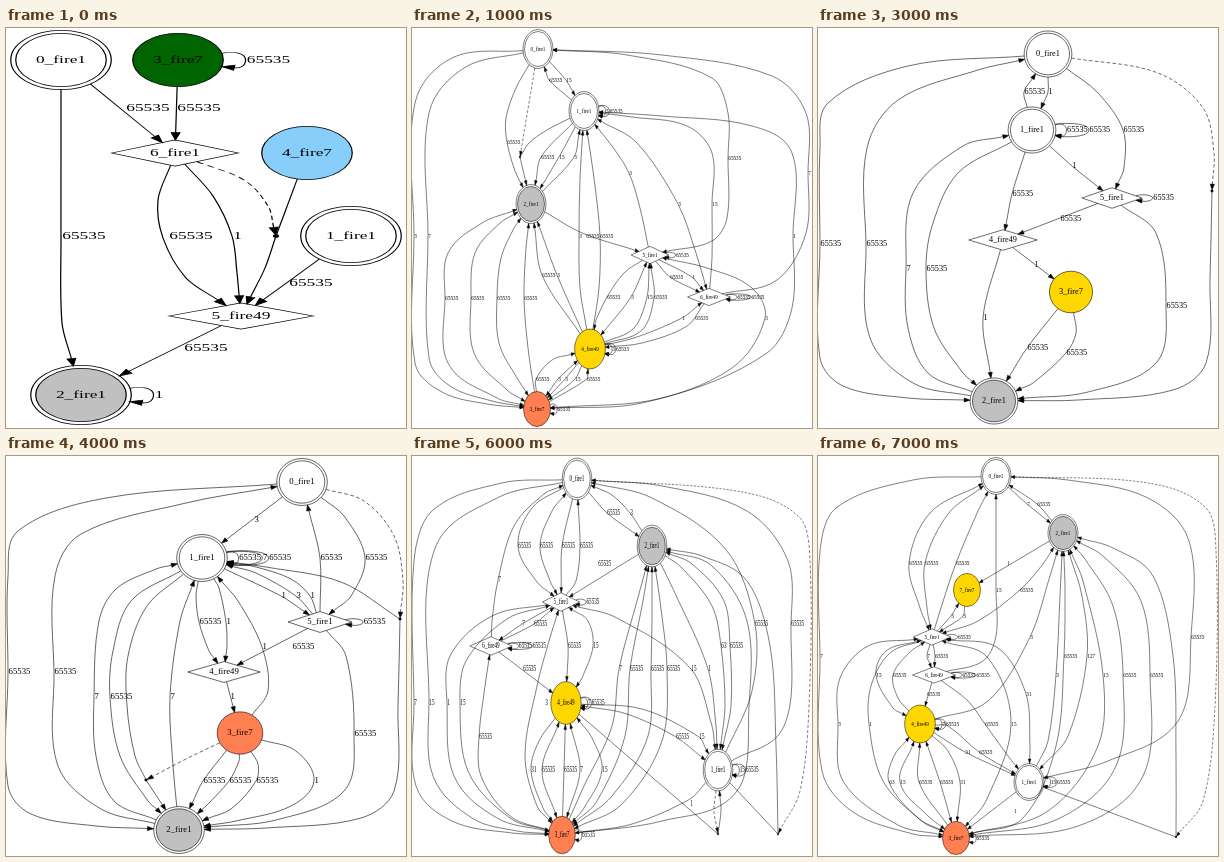
These frames come from a looping animation (400 px wide and 400 px high, 8000 ms). An HTML page:

```html
<!DOCTYPE html>
<html lang="en">
<head>
<meta charset="utf-8">
<title>Evolving graph</title>
<style>
html, body { margin: 0; width: 100%; height: 100%; overflow: hidden; background: #fff; }
svg { display: block; width: 100%; height: 100%; }
text { font: 14px "Liberation Serif", "Times New Roman", serif; fill: #000; stroke: none; }
</style>
</head>
<body>
<svg id="stage" viewBox="0 0 400 400"></svg>
<script>
const stage = document.getElementById('stage');
const GREY = '#c0c0c0', GOLD = '#ffd700', CORAL = '#ff7f50';
const scenes = [];

function make(parent, tag, attrs, text) {
  const el = document.createElementNS('http://www.w3.org/2000/svg', tag);
  for (const k in attrs) el.setAttribute(k, attrs[k]);
  if (text) el.textContent = text;
  return parent.appendChild(el);
}

const toward = (a, b, d) => {
  const len = Math.hypot(b[0] - a[0], b[1] - a[1]) || 1;
  return [a[0] + (b[0] - a[0]) / len * d, a[1] + (b[1] - a[1]) / len * d];
};

// Smooth path whose handles follow the chord between neighbours
function spline(p) {
  const last = p.length - 1;
  const handle = (i, sign, other) => {
    const a = p[Math.max(i - 1, 0)], b = p[Math.min(i + 1, last)];
    const len = Math.hypot(p[i][0] - other[0], p[i][1] - other[1]) / 3;
    const q = toward(a, b, len);
    return [p[i][0] + sign * (q[0] - a[0]), p[i][1] + sign * (q[1] - a[1])];
  };
  let d = 'M' + p[0];
  for (let i = 0; i < last; i++)
    d += `C${handle(i, 1, p[i + 1])} ${handle(i + 1, -1, p[i])} ${p[i + 1]}`;
  return d;
}

// Shapes live in points; each graph is squeezed to the stage by sx, sy
function graph(sx, sy, draw) {
  const g = make(stage, 'g', {
    transform: `scale(${sx} ${sy})`, fill: 'none', stroke: '#000',
    'stroke-width': Math.max(1, 0.5 / Math.sqrt(sx * sy)), visibility: 'hidden'
  });
  const nodes = {};
  const at = s => { const [x, y] = s.split(',').map(Number); return [x / sx, y / sy]; };
  const write = (x, y, s, anchor = 'start') =>
    make(g, 'text', { x, y: y + 4.3, 'text-anchor': anchor }, s);

  // kind: c circle, d double circle, r rhombus
  function node(name, pos, kind, fill = '#fff') {
    const [x, y] = at(pos), wide = name.endsWith('49');
    const r = kind == 'r' ? (wide ? 58 : 51) : (wide ? 41.5 : 36.5) + (kind == 'd' ? 4 : 0);
    nodes[name[0]] = { c: [x, y], r, kind };
    if (kind == 'r') make(g, 'path', { d: `M${x - r} ${y}L${x} ${y - 18}L${x + r} ${y}L${x} ${y + 18}Z`, fill });
    else make(g, 'circle', { cx: x, cy: y, r, fill: kind == 'd' ? '#fff' : fill });
    if (kind == 'd') make(g, 'circle', { cx: x, cy: y, r: r - 4, fill });
    write(x, y, name, 'middle');
  }

  function dot(id, pos) {
    const c = at(pos);
    nodes[id] = { c, r: 2, kind: 'c' };
    make(g, 'circle', { cx: c[0], cy: c[1], r: 2, fill: '#000' });
  }

  function rim(n, to) {
    const dx = to[0] - n.c[0], dy = to[1] - n.c[1];
    const d = n.kind == 'r'
      ? Math.hypot(dx, dy) / (Math.abs(dx) / n.r + Math.abs(dy) / 18) : n.r;
    return toward(n.c, to, d);
  }

  function arrow(tip, from) {
    const b = toward(tip, from, 10), nx = (tip[1] - b[1]) * 0.35, ny = (b[0] - tip[0]) * 0.35;
    make(g, 'path', { d: `M${tip}L${b[0] + nx} ${b[1] + ny}L${b[0] - nx} ${b[1] - ny}Z`, fill: '#000' });
    return b;
  }

  // link: a>b arrow, a<>b both, a-b plain, a~b dashed; *x,y via with label, @x,y label only
  function edge(link, label = '', route = '') {
    const [, a, type, b] = link.match(/(\w)(<>|>|-|~)(\w)/);
    const A = nodes[a], B = nodes[b], via = [];
    let spot;
    for (const s of route.split(' ').filter(Boolean)) {
      const p = at(s.replace(/[*@]/, ''));
      if (/[*@]/.test(s)) spot = p;
      if (s[0] != '@') via.push(p);
    }
    const first = via[0] || B.c, end = via[via.length - 1] || A.c;
    let p0 = rim(A, first), p1 = rim(B, end);
    if (type != '-') p1 = arrow(p1, via.length ? end : p0);
    if (type == '<>') p0 = arrow(p0, first);
    const path = make(g, 'path', { d: spline([p0, ...via, p1]) });
    if (type == '~') path.setAttribute('stroke-dasharray', '6 4');
    spot = spot || via[via.length >> 1] || [(p0[0] + p1[0]) / 2, (p0[1] + p1[1]) / 2];
    if (label) write(spot[0] + 1, spot[1], label);
  }

  function loop(id, ...labels) {
    const { c: [x, y], r, kind } = nodes[id];
    let out = x + r + 18;
    labels.forEach((s, i) => {
      const h = (kind == 'r' ? 4 : 9) + i, x0 = x + (kind == 'r' ? r * 0.8 : r * 0.97);
      const tip = [x0, y + h], b = arrow(tip, [x0 + 10, y + h + 1.5]), mid = (x0 + out) / 2;
      make(g, 'path', { d: `M${x0} ${y - h}C${mid} ${y - h - 4} ${out} ${y - h} ${out} ${y}S${mid + 4} ${y + h + 3} ${b}` });
      write(out + 1, y, s);
      out += s.length * 7 + 3;
    });
  }

  draw(node, edge, loop, dot);
  scenes.push(g);
}

const N = '65535';

graph(1.24, 0.73, (node, edge, loop, dot) => {
  node('0_fire1', '55,32', 'd');
  node('3_fire7', '172,32', 'c', '#006400');
  node('6_fire1', '169,125', 'r');
  node('4_fire7', '301,125', 'c', '#87cefa');
  node('1_fire1', '345,208', 'd');
  node('5_fire49', '235,288', 'r');
  node('2_fire1', '75,367', 'd', GREY);
  dot('p', '270,208');
  edge('0>2', N, '55,120 *55,208 56,295');
  edge('0>6', N, '@119,80');
  edge('3>6', N, '@170,80');
  edge('6>5', N, '152,172 157,210 180,250 @162,208');
  edge('6>5', '1', '207,168 *226,208 231,245');
  edge('6~p', '', '238,152 262,178');
  edge('4-p');
  edge('p>5', '', '259,240');
  edge('1>5', N, '@282,255');
  edge('5>2', N, '@177,320');
  loop('3', N);
  loop('2', '1');
});

graph(0.37, 0.48, (node, edge, loop, dot) => {
  node('0_fire1', '126,21', 'd');
  node('1_fire1', '172,83', 'd');
  node('2_fire1', '119,176', 'd', GREY);
  node('5_fire1', '238,227', 'r');
  node('6_fire49', '297,269', 'r');
  node('4_fire49', '178,321', 'c', GOLD);
  node('3_fire7', '125,381', 'c', CORAL);
  dot('p', '108,129');
  edge('0>3', '3', '40,30 3,75 *2,208 3,335 30,364 75,376');
  edge('0>3', '7', '52,40 17,85 *16,208 17,330 38,358 80,373');
  edge('0>2', N, '104,60 94,90 *95,114 103,143');
  edge('0~p');
  edge('1-p', '', '135,102 117,115');
  edge('p>2');
  edge('0>1', '15', '*154,52');
  edge('1>0', N, '*137,52');
  edge('0<>5', N, '215,27 300,50 316,85 *316,130 315,190 300,213');
  edge('6>0', '7', '365,252 394,205 *396,145 394,85 360,48 250,27');
  edge('3<>1', '1', '250,370 355,325 380,280 *381,208 380,125 340,98 250,88');
  edge('1>2', N, '*129,129');
  edge('1>2', '15', '*147,129');
  edge('2>1', '3', '*162,129');
  edge('4>1', '3', '168,260 *167,208 168,150');
  edge('4>1', N, '187,260 *188,208 182,150');
  edge('2>5', N, '@174,208 170,205');
  edge('5>1', '3', '228,180 *217,145 200,118');
  edge('1<>6', '3', '225,115 *266,176 284,225');
  edge('6>1', '15', '300,230 *300,176 300,125 275,98 220,89');
  edge('4>2', N, '*130,247');
  edge('4>2', '3', '*145,247');
  edge('3>2', N, '116,320 *112,270 114,220');
  edge('3<>2', N, '85,370 36,335 *33,270 36,225 70,195');
  edge('3<>2', N, '95,362 62,325 *59,270 63,225 88,195');
  edge('3<>2', N, '105,350 87,315 *85,270 89,230 102,200');
  edge('5>4', N, '212,245 *195,269 184,292');
  edge('5<>4', '3', '*219,269');
  edge('4>5', '15', '222,300 *235,269');
  edge('4>5', N, '230,302 *242,269');
  edge('5>6', N, '*258,249');
  edge('5>6', '1', '*280,249');
  edge('4>6', '1', '225,309 *270,290');
  edge('6>4', N, '@283,290 275,298 230,315');
  edge('3<>5', '3', '230,375 320,340 *353,290 340,260 295,240');
  edge('3>4', N, '*124,351 140,332');
  edge('3<>4', '3', '*146,351');
  edge('4>3', '3', '*153,351');
  edge('4>3', '15', '*163,351');
  edge('3>4', N, '*175,351');
  loop('1', '3', N);
  loop('5', N);
  loop('6', N, N);
  loop('4', '3', N);
  loop('3', N);
});

graph(0.56, 0.56, (node, edge, loop, dot) => {
  node('0_fire1', '166,26', 'd');
  node('1_fire1', '232,101', 'd');
  node('2_fire1', '216,177', 'd', GREY);
  node('4_fire49', '273,178', 'c', GOLD);
  node('5_fire7', '273,251', 'c', GOLD);
  node('6_fire49', '152,311', 'r');
  node('3_fire49', '186,363', 'r');
  dot('p', '273,362');
  dot('q', '353,396');
  edge('0>3', N, '70,36 10,75 2,120 *2,215 2,320 20,346 90,357');
  edge('0<>6', '1', '65,52 33,90 *32,177 36,265 75,297');
  edge('0>6', N, '85,62 58,110 *57,177 62,250 105,293');
  edge('0>6', N, '117,65 100,120 *98,177 103,250 125,288');
  edge('6>0', N, '147,250 *144,177 150,100');
  edge('0>2', '1', '156,75 *161,101 173,138');
  edge('0>2', N, '171,68 *183,101 195,138');
  edge('0>1', '1', '*200,64');
  edge('1>0', N, '*213,64');
  edge('0>2', N, '262,43 323,75 *330,101 322,132 275,158');
  edge('2>1', '255', '213,145 *214,139');
  edge('1>2', N, '*226,139');
  edge('1>6', '1', '209,124 180,165 *166,215 157,270');
  edge('2>3', '1', '@198,287');
  edge('4>3', '1', '*224,287');
  edge('5>6', '1', '@218,287');
  edge('2>5', '1', '@247,215');
  edge('4>5', N, '@272,215');
  edge('5~p');
  edge('6-p');
  edge('5-q');
  edge('3~q');
  edge('p>0', '', '335,340 373,310 375,200 370,110 305,57');
  edge('q>0', '', '388,375 396,330 396,200 393,100 330,47');
  edge('6>3', '1', '*154,337');
  edge('3>6', '1', '*172,337');
  loop('0', '1');
  loop('1', N, N);
});

graph(0.59, 0.57, (node, edge, loop, dot) => {
  node('0_fire1', '230,26', 'd');
  node('1_fire1', '214,102', 'd');
  node('5_fire1', '294,170', 'r');
  node('4_fire49', '185,212', 'r');
  node('3_fire7', '253,264', 'c', GOLD);
  node('2_fire1', '176,373', 'd', GREY);
  dot('p', '394,163');
  edge('0>2', N, '90,38 10,75 2,120 *2,216 2,330 25,358 90,370');
  edge('2>0', N, '95,355 52,310 *48,216 49,120 80,72 160,42');
  edge('0>1', '1', '*230,64');
  edge('1>0', N, '*206,64');
  edge('0>5', N, '280,65 *305,102 306,140');
  edge('0~p', '', '340,45 385,80 396,125');
  edge('p>2', '', '392,250 388,335 355,362 260,372');
  edge('1>5', '1', '*254,138');
  edge('1>4', N, '*194,166');
  edge('5>4', N, '@242,191');
  edge('4>3', '1', '@216,237');
  edge('5>2', N, '338,205 *348,278 338,335 270,364');
  edge('2>1', '7', '110,345 90,300 *88,241 95,165 145,118');
  edge('1>2', N, '140,145 115,195 *108,241 116,300 145,345');
  edge('4>2', '1', '*165,290');
  edge('3>2', N, '*209,320');
  edge('3>2', N, '258,305 *248,325 215,355');
  loop('1', N, N);
  loop('5', N);
});

graph(0.625, 0.58, (node, edge, loop, dot) => {
  node('0_fire1', '296,26', 'd');
  node('1_fire1', '196,102', 'd');
  node('5_fire1', '314,166', 'r');
  node('4_fire49', '218,216', 'r');
  node('3_fire7', '234,277', 'c', CORAL);
  node('2_fire1', '173,374', 'd', GREY);
  dot('p', '394,163');
  dot('q', '140,324');
  edge('0>1', '3', '@248,64');
  edge('0>2', N, '100,42 12,75 2,120 *2,216 2,330 25,358 90,370');
  edge('2>0', N, '95,353 52,310 *48,216 49,120 75,78 180,47');
  edge('0>5', N, '338,60 *359,102 345,140');
  edge('5>0', N, '*314,102');
  edge('0~p', '', '358,45 388,80 397,125');
  edge('p>1', '', '335,126 260,111');
  edge('p>2', '', '392,250 388,335 355,362 260,372');
  edge('1>5', '1', '*275,140');
  edge('5>1', '3', '*290,140 250,117');
  edge('5>1', '1', '*304,140 285,123 250,111');
  edge('5>2', N, '340,200 *348,278 338,335 270,364');
  edge('1>4', N, '190,140 *193,166 203,195');
  edge('1>4', '1', '213,132 *220,166 221,190');
  edge('5>4', N, '@286,191');
  edge('4>3', '1', '@224,241');
  edge('3>1', '1', '262,235 *256,191 232,145');
  edge('2>1', '7', '108,345 90,300 *88,241 93,165 110,133 150,113');
  edge('1>2', N, '125,145 107,195 *104,241 114,300 142,345');
  edge('1-q', '', '141,150 122,200 121,250 129,300');
  edge('q>2');
  edge('2>1', '7', '167,310 *164,241 174,165');
  edge('3~q', '', '180,303');
  edge('3>2', N, '*197,325');
  edge('3>2', N, '233,305 *223,325 200,350');
  edge('3>2', N, '252,308 *250,325 225,353');
  edge('3>2', '1', '290,295 *308,325 285,350 230,365');
  loop('1', N, '7', N);
  loop('5', N);
});

graph(0.45, 0.53, (node, edge, loop, dot) => {
  node('0_fire1', '205,24', 'd');
  node('2_fire1', '264,94', 'd', GREY);
  node('5_fire1', '166,152', 'r');
  node('6_fire49', '92,200', 'r');
  node('4_fire49', '186,250', 'c', GOLD);
  node('1_fire1', '312,312', 'd');
  node('3_fire7', '160,377', 'c', CORAL);
  dot('p', '372,378');
  edge('0>3', '7', '100,30 20,62 2,110 *2,247 4,330 40,363 100,375');
  edge('5<>3', '15', '80,165 36,200 *33,260 40,320 85,360');
  edge('6>0', '7', '92,165 *100,124 125,70 165,40');
  edge('0>5', N, '160,60 *146,90 150,125');
  edge('5>0', N, '*182,90');
  edge('0>2', N, '*226,58');
  edge('2>0', '3', '*252,58');
  edge('2>5', N, '@208,114');
  edge('1>0', N, '352,240 *356,168 335,90 265,40');
  edge('0~p', '', '335,40 393,75 398,120 397,250 390,330');
  edge('1-p');
  edge('2>1', '63', '300,150 *314,200 316,250');
  edge('5>1', '15', '220,170 *280,222 302,270');
  edge('3>2', N, '215,345 262,280 *268,213 267,150');
  edge('3<>2', N, '200,340 232,280 *240,213 252,150');
  edge('5>6', N, '*126,174');
  edge('5>4', N, '*171,195');
  edge('6>4', N, '@134,222');
  edge('3>6', N, '105,355 76,320 *74,281 82,235');
  edge('4>1', N, '*254,281');
  edge('4>3', '31', '150,285 *138,314 146,345');
  edge('3>4', N, '*168,314');
  edge('3>4', '15', '*194,314');
  edge('1>3', '1', '285,345 *235,364');
  loop('5', N);
  loop('6', N, N);
  loop('4', '7', N);
  loop('1', N);
  loop('3', N);
});

graph(0.365, 0.515, (node, edge, loop, dot) => {
  node('0_fire1', '165,23', 'd');
  node('2_fire1', '240,90', 'd', GREY);
  node('5_fire1', '149,146', 'r');
  node('6_fire49', '79,190', 'r');
  node('4_fire49', '154,247', 'c', GOLD);
  node('1_fire1', '306,314', 'd');
  node('3_fire7', '150,379', 'c', CORAL);
  dot('p', '306,378');
  dot('q', '366,378');
  edge('0>3', '7', '90,27 20,55 2,105 *2,247 4,330 40,365 100,377');
  edge('0>3', '15', '85,42 22,95 *17,247 21,320 60,362 105,375');
  edge('5>3', '1', '80,160 38,200 *35,247 42,320 85,362');
  edge('5<>3', '15', '95,163 54,205 *48,247 56,315 98,362');
  edge('6>0', '7', '80,165 *86,124 102,70 132,38');
  edge('0>5', N, '120,52 *106,90 125,126');
  edge('0<>5', N, '140,55 *128,90 138,125');
  edge('0>5', N, '*150,90');
  edge('5>0', N, '164,125 *168,90');
  edge('0>2', N, '*195,57');
  edge('2>0', '3', '*218,57 200,39');
  edge('2>5', N, '@186,108');
  edge('1>0', N, '340,235 *343,168 315,95 240,42');
  edge('1>0', N, '372,270 *379,168 376,105 335,55 250,30');
  edge('0~q', '', '330,36 388,62 398,105 397,250 388,335');
  edge('q>2', '', '364,290 358,190 335,125 290,100');
  edge('2>1', '63', '270,112 300,150 *309,190 313,250');
  edge('2<>1', N, '280,108 312,145 *318,190 319,250');
  edge('2>1', '1', '262,135 *296,213 304,270');
  edge('5<>1', '15', '205,162 *279,213 300,270');
  edge('3>2', '7', '172,330 200,270 *207,213 225,145');
  edge('3<>2', N, '185,345 213,280 *218,213 231,145');
  edge('3<>2', N, '200,340 236,280 *239,213 240,160');
  edge('3<>2', N, '210,348 250,285 *255,213 248,145');
  edge('3>2', '', '250,365 325,335 337,250 335,165 300,110');
  edge('5>6', '7', '*110,168');
  edge('6>5', N, '*122,168');
  edge('5>4', N, '*156,190');
  edge('5<>4', '15', '176,165 *181,190 170,222');
  edge('6>4', N, '@111,213');
  edge('3>6', N, '98,360 69,320 *67,281 73,230');
  edge('5<>3', '3', '137,185 125,230 113,300 125,350 @133,247');
  edge('4>3', '31', '127,285 *119,314 131,352');
  edge('4<>3', N, '*130,314');
  edge('3>4', N, '*152,314');
  edge('3<>4', '7', '*168,314');
  edge('4<>3', '15', '180,282 *190,314 172,352');
  edge('4<>1', N, '215,258 *264,281');
  edge('4>1', '15', '230,253 *287,281');
  edge('4-p', '1', '@278,348');
  edge('p>1', '', '309,355');
  edge('1~p', '', '302,355');
  edge('1-q');
  edge('1>3', '', '278,343 220,368');
  loop('5', N);
  loop('6', N, N);
  loop('4', '7', N);
  loop('1', '15', N);
  loop('3', N);
});

graph(0.37, 0.455, (node, edge, loop, dot) => {
  node('0_fire1', '178,20', 'd');
  node('2_fire1', '245,77', 'd', GREY);
  node('7_fire7', '149,134', 'c', GOLD);
  node('5_fire1', '114,181', 'r');
  node('6_fire49', '116,219', 'r');
  node('4_fire49', '102,268', 'c', GOLD);
  node('1_fire1', '211,326', 'd');
  node('3_fire7', '138,382', 'c', CORAL);
  dot('p', '358,381');
  edge('0>3', '7', '95,24 18,52 2,95 *2,200 4,315 35,356 95,378');
  edge('5<>3', '3', '50,190 22,222 *20,268 25,325 80,369');
  edge('5>3', '1', '72,197 53,230 *51,268 65,325 105,366');
  edge('0<>5', N, '112,57 *91,107 102,152');
  edge('0<>5', N, '130,58 *107,107 109,152');
  edge('5>0', N, '122,155 *138,107 160,55');
  edge('6>0', '15', '165,205 178,180 *178,134 178,80');
  edge('0>2', '7', '*209,48');
  edge('2>0', N, '*219,48');
  edge('2>7', '1', '@189,107');
  edge('2<>5', N, '225,108 *202,134 160,165');
  edge('5>7', '3', '*133,160');
  edge('7>5', '3', '*145,160');
  edge('5>6', '7', '*109,200');
  edge('5>6', N, '*117,200');
  edge('5<>4', '15', '68,195 *58,219 75,252');
  edge('4>5', N, '80,242 *75,219 92,196');
  edge('6>4', N, '@109,238');
  edge('4>2', '3', '170,245 *212,181 232,120');
  edge('6>1', N, '150,245 *167,268 190,300');
  edge('5<>1', '31', '180,192 *208,238 212,290');
  edge('5<>3', '15', '170,202 *193,268 168,345');
  edge('1>2', '3', '230,285 *238,219 242,140');
  edge('3<>2', N, '205,362 238,290 *246,200 247,130');
  edge('2<>1', '127', '264,140 *269,200 250,280');
  edge('3>2', '15', '230,355 280,290 *285,219 265,125');
  edge('3<>2', N, '240,363 298,310 *305,219 295,150 267,103');
  edge('3<>2', N, '260,370 325,320 *332,219 323,145 285,100');
  edge('p>2', '', '358,300 355,200 335,120 295,92');
  edge('1-p');
  edge('0~p', '', '330,27 388,52 398,95 397,250 385,345');
  edge('1<>0', N, '290,305 360,265 *373,181 371,85 330,42 250,24');
  edge('4>1', '31', '*147,296');
  edge('4>1', N, '130,270 *161,296');
  edge('1>3', '1', '@196,355');
  edge('4<>3', '63', '76,300 *71,326 100,362');
  edge('4<>3', '15', '*82,326 110,360');
  edge('3>4', N, '*101,326');
  edge('3<>4', N, '*122,326');
  edge('4>3', '31', '130,295 *142,326');
  loop('5', N);
  loop('6', N, N);
  loop('4', '7', N);
  loop('1', '15', N);
  loop('3', N);
});

const start = performance.now();
let shown = -1;
function update(now) {
  const i = Math.floor(Math.max(0, now - start) / 1000) % scenes.length;
  if (i != shown) {
    shown = i;
    scenes.forEach((g, k) => g.setAttribute('visibility', k == i ? 'visible' : 'hidden'));
  }
  requestAnimationFrame(update);
}
update(start);
</script>
</body>
</html>
```
